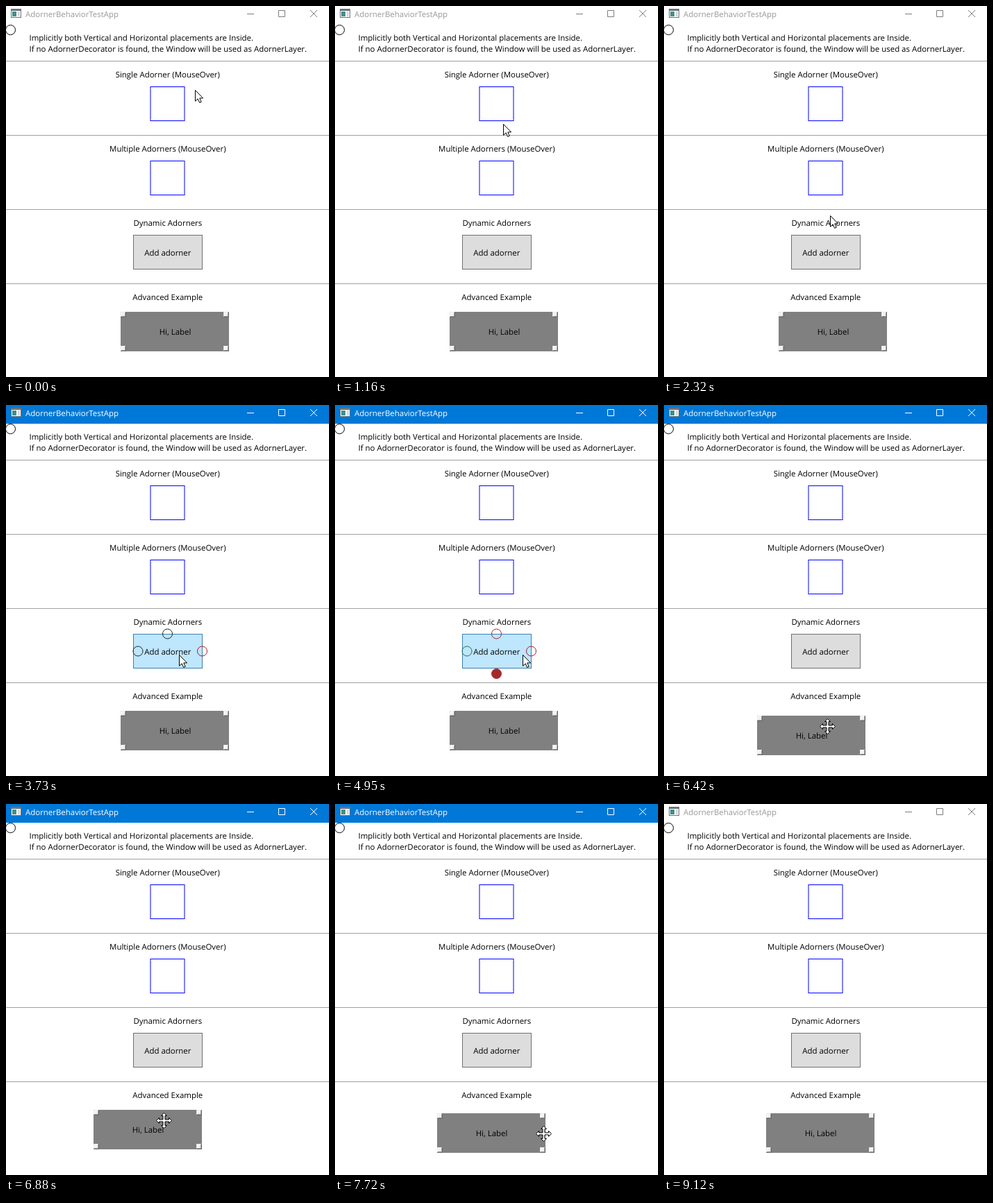
These frames come from a looping animation (465x535 px, 9.2 s). An HTML page:

```html
<!DOCTYPE html>
<html lang="en">
<head>
<meta charset="utf-8">
<title>AdornerBehaviorTestApp</title>
<style>
  html, body { margin: 0; width: 100%; height: 100%; overflow: hidden; background: #fff; }
  svg { display: block; }
  text { font: 11.45px "Open Sans", "Noto Sans", sans-serif; text-rendering: geometricPrecision; }
  .mid { text-anchor: middle; }
  .ring { fill: none; }
  .square { fill: none; stroke: #00f; }
  .crisp { shape-rendering: crispEdges; }
</style>
</head>
<body>
<svg width="465" height="535" viewBox="0 0 465 535">
  <defs>
    <g id="thumb" class="crisp">
      <rect width="8" height="8" fill="#696969"/>
      <rect width="7" height="7" fill="#e3e3e3"/>
      <rect x="1" y="1" width="6" height="6" fill="#a0a0a0"/>
      <rect x="1" y="1" width="5" height="5" fill="#fff"/>
      <rect x="2" y="2" width="4" height="4" fill="#f0f0f0"/>
    </g>
  </defs>

  <rect id="bar" width="465" height="27"/>
  <g class="crisp">
    <rect x="7" y="4" width="15" height="13" fill="#6d7478"/>
    <rect x="8" y="7" width="13" height="9" fill="#fff"/>
    <rect x="9" y="8" width="6" height="7" fill="#3f8f8a"/>
    <rect x="17" y="8" width="3" height="7" fill="#d5d9dc"/>
  </g>
  <text id="title" x="28" y="16">AdornerBehaviorTestApp</text>
  <path id="buttons" fill="none" d="M347 11.5h10M392.5 6.5h9v9h-9zM438 6l10 10M448 6l-10 10"/>

  <text x="33.5" y="50">Implicitly both Vertical and Horizontal placements are Inside.</text>
  <text x="33.5" y="66">If no AdornerDecorator is found, the Window will be used as AdornerLayer.</text>

  <g id="sections"></g>
  <rect class="square" x="208" y="116.5" width="49" height="49"/>
  <rect class="square" x="208" y="223.5" width="49" height="49"/>
  <rect id="add" x="183.5" y="330.5" width="99" height="49"/>
  <text class="mid" x="232.8" y="360">Add adorner</text>

  <g id="label">
    <rect width="156" height="57" fill="#808080"/>
    <text class="mid" x="78.5" y="33">Hi, Label</text>
    <use href="#thumb"/>
    <use href="#thumb" x="148"/>
    <use href="#thumb" y="49"/>
    <use href="#thumb" x="148" y="49"/>
  </g>

  <g id="rings"></g>
  <path id="arrow" fill="#fff" stroke="#000" d="M.5 .5V16.3L4.2 12.9L6.7 18.4L9.2 17.3L6.8 11.9H11.6Z"/>
  <path id="move" fill="#fff" stroke="#000"/>
</svg>
<script>
const LOOP = 9200, STEP = 77;
const GRAB = { x: 101, y: 15 }, DRAG_START = 6260, DRAG_END = 7420, HIDE = 8030;
const GREEN = '#1d7a3c', BROWN = '#a52a2a', RED = '#b01c1c';
const $ = id => document.getElementById(id);

function add(parent, tag, attrs, text = '') {
  const el = document.createElementNS('http://www.w3.org/2000/svg', tag);
  for (const name in attrs) el.setAttribute(name, attrs[name]);
  el.textContent = text;
  return $(parent).appendChild(el);
}

['Single Adorner (MouseOver)', 'Multiple Adorners (MouseOver)', 'Dynamic Adorners', 'Advanced Example']
  .forEach((heading, i) => {
    const y = 79.5 + 107 * i;
    add('sections', 'path', { d: `M0 ${y}h465`, stroke: '#a0a0a0' });
    add('sections', 'text', { class: 'mid', x: 232.8, y: y + 23.5 }, heading);
  });

const ring = (cx, cy, stroke) => add('rings', 'circle', { class: 'ring', cx, cy, r: 7, stroke });

// Left inside, right and top on the edge, bottom outside
function ringsAround({ x, y, w, h }) {
  const rings = [
    ring(x + 7.5, y + h / 2, GREEN),
    ring(x + w, y + h / 2, RED),
    ring(x + w / 2, y, BROWN),
    ring(x + w / 2, y + h + 7.5, BROWN)
  ];
  rings[3].style.fill = BROWN;
  return rings;
}

const first = { x: 207.5, y: 116, w: 50, h: 50 };
const second = { ...first, y: 223 };
const button = { x: 182.5, y: 330, w: 100, h: 50 };
ring(6.5, 34.5, '#000');
const single = ring(first.x, 140.5, '#000');
const multiple = ringsAround(second);
const dynamic = ringsAround(button);

// Four-way pointer: one arm repeated in quarter turns
const arm = [[-1.5, -7], [-4, -7], [0, -11], [4, -7], [1.5, -7], [1.5, -1.5]];
const turn = ([x, y], q) => q ? turn([-y, x], q - 1) : [x, y];
const outline = [0, 1, 2, 3].flatMap(q => arm.map(p => turn(p, q)));
$('move').setAttribute('d', 'M' + outline.join('L') + 'Z');

// Pointer strokes: start, steps, end point
const strokes = [
  [300, 3, 246, 133],
  [1010, 6, 235, 243],
  [2160, 3, 239, 302],
  [2400, 3, 249, 360],
  [3960, 3, 294, 360],
  [4260, 3, 260, 360],
  [4950, 3, 291, 361],
  [5340, 7, 266, 456],
  [6260, 3, 235, 463],
  [6490, 3, 220, 456],
  [6720, 3, 227, 456],
  [6960, 2, 281, 455],
  [7110, 5, 248, 461],
  [7570, 6, 403, 502]
];
const clicks = [[2780, 2860], [3180, 3240], [3560, 3730], [4570, 4650]];

function pointer(t) {
  let x = 272, y = 121;
  for (const [start, steps, toX, toY] of strokes) {
    if (t < start) break;
    const done = Math.min(1, (Math.floor((t - start) / STEP) + 1) / steps);
    x += (toX - x) * done;
    y += (toY - y) * done;
  }
  return { x: Math.round(x), y: Math.round(y) };
}

const inside = (p, { x, y, w, h }) => p.x >= x && p.x < x + w && p.y >= y && p.y < y + h;
const show = (el, on) => { el.style.display = on ? '' : 'none'; };
const place = (el, { x, y }) => el.setAttribute('transform', `translate(${x} ${y})`);
const paint = (el, fill, stroke) => Object.assign(el.style, { fill, stroke });

function draw(t) {
  const at = pointer(t);
  const active = t >= clicks[0][0] && t < 9120;
  paint($('bar'), active ? '#0078d7' : '#fff', 'none');
  $('title').style.fill = active ? '#fff' : '#999';
  $('buttons').style.stroke = active ? '#fff' : '#7c7c7c';

  show(single, inside(at, first));
  multiple.forEach(el => show(el, inside(at, second)));

  const over = inside(at, button);
  const pressed = clicks.some(([down, up]) => t >= down && t < up);
  if (pressed) paint($('add'), '#c4e5f6', '#2c628b');
  else if (over) paint($('add'), '#bee6fd', '#3c7fb1');
  else paint($('add'), '#ddd', '#707070');
  // Left and top start out dark and take their colour on the second visit
  dynamic.forEach((el, i) => {
    show(el, over && t >= clicks[i][1]);
    el.style.stroke = i % 2 || t > 4110 ? '' : '#1c2a22';
  });

  const held = pointer(Math.min(t, DRAG_END));
  const label = { x: 165, y: 441, w: 156, h: 57 };
  if (t >= DRAG_START) Object.assign(label, { x: held.x - GRAB.x, y: held.y - GRAB.y });
  place($('label'), label);

  const moving = inside(at, label);
  show($('arrow'), t < HIDE && !moving);
  show($('move'), t < HIDE && moving);
  place($('arrow'), at);
  place($('move'), { x: at.x + 0.5, y: at.y + 0.5 });
}

function tick() {
  draw(performance.now() % LOOP);
  requestAnimationFrame(tick);
}
tick();
</script>
</body>
</html>
```
